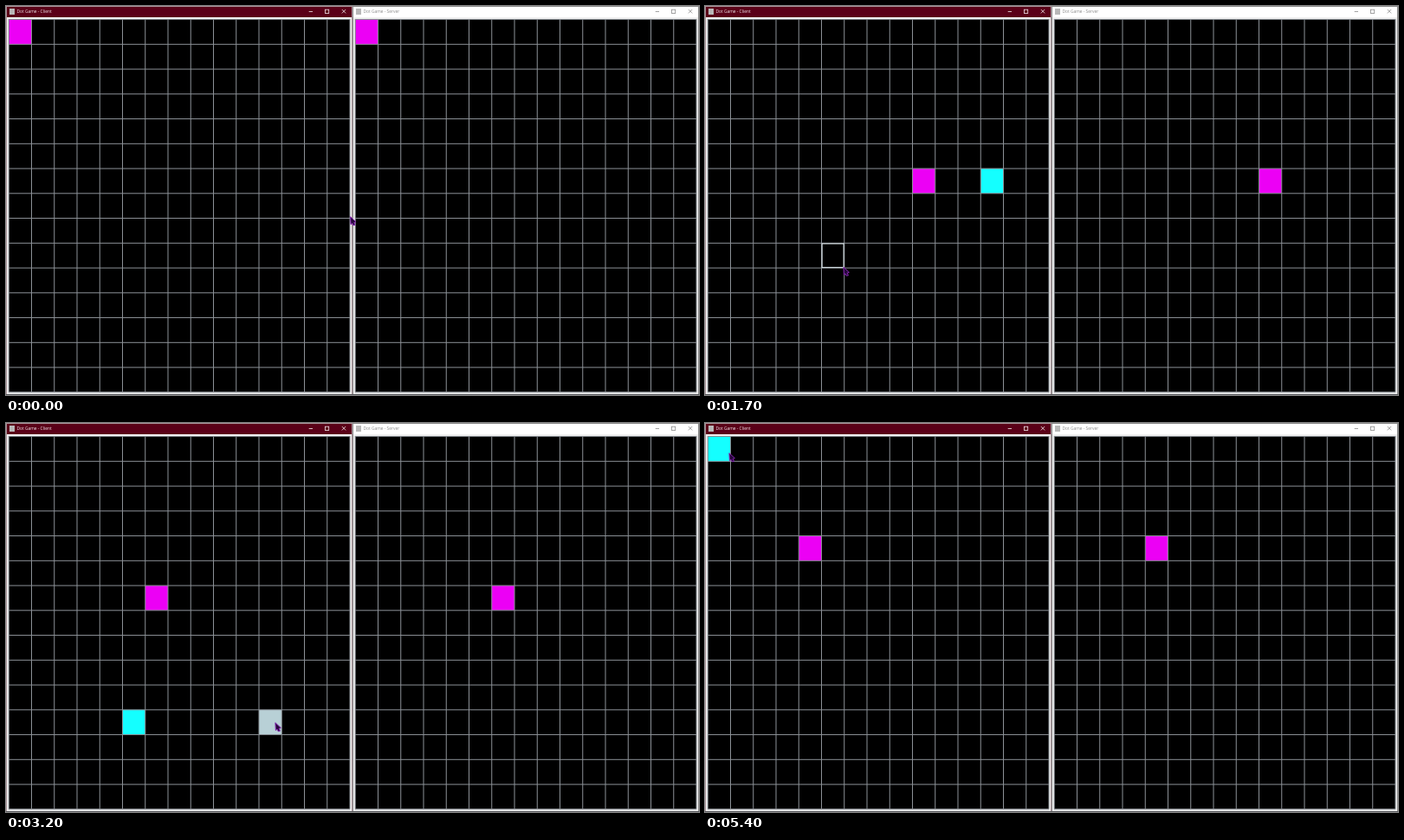
Write an HTML page with a canvas that moves like this. It is 800x450 px and loops after 5.5 s.

```html
<!DOCTYPE html>
<html lang="en">
<head>
<meta charset="utf-8">
<title>Dot Game</title>
<style>
html, body { margin: 0; width: 100%; height: 100%; overflow: hidden; background: #000; }
canvas { display: block; width: 800px; height: 450px; }
</style>
</head>
<body>
<canvas id="stage" width="800" height="450"></canvas>
<script>
const ctx = document.getElementById('stage').getContext('2d');
const LOOP = 5500, TICK = 100, CELLS = 15;
const LEFT = 3.25, TOP = 15.55, CELL_W = 26.25, CELL_H = 28.75;
const FIRST_STEP = 30, STEP = 190, NETWORK_LAG = 40;
const PRESS = 50, REST = 100;
const MAGENTA = '#ec00f5', CYAN = '#14ffff', PRESSED = '#b8d0d6';

// The player's clicks: time, then place in cell units.
const START = { at: 0, x: 15, y: 7.92 };
const clicks = [
  [400, 12.8, 6.9], [1800, 5.95, 9.95], [2160, 2.63, 5.56], [2450, 7.5, 5.5],
  [2890, 5.5, 11.5], [3250, 11.7, 11.5], [3600, 14.5, 14.5], [3950, 7.39, 6.92],
  [4180, 9.5, 11.5], [4380, 7.5, 4.5], [4800, 2.02, 2.02], [5150, 0.92, 0.65]
].map(([at, x, y]) => ({ at, x, y }));

const cellOf = p => [Math.floor(p.x), Math.floor(p.y)];
const lastClick = t => clicks.filter(c => c.at <= t).pop();

// The chaser takes one king's step towards the player's dot per beat.
function chaserAt(t) {
  const pos = [0, 0];
  for (let beat = FIRST_STEP; beat <= t; beat += STEP) {
    const goal = cellOf(lastClick(beat) || clicks[0]);
    goal.forEach((g, i) => pos[i] += Math.sign(g - pos[i]));
  }
  return pos;
}

// The pointer glides to each click, slowing down, and rests before it.
function pointerAt(t) {
  const from = lastClick(t) || START;
  const to = clicks.find(c => c.at > t) || from;
  const part = Math.min(1, (t - from.at) / (to.at - REST - from.at || 1));
  const ease = Math.sin(part * Math.PI / 2);
  return { x: from.x + (to.x - from.x) * ease, y: from.y + (to.y - from.y) * ease };
}

function rect(x, y, w, h, color) {
  ctx.fillStyle = color;
  ctx.fillRect(x, y, w, h);
}

function frameRect(x, y, w, h, color, weight) {
  ctx.strokeStyle = color;
  ctx.lineWidth = weight;
  ctx.strokeRect(x, y, w, h);
}

const colX = c => LEFT + c * CELL_W;
const rowY = r => TOP + r * CELL_H;

function drawWindow({ title, bar, ink, edge }, cells) {
  rect(0, 0, 400, 450, '#efefef');
  rect(0, 0, 400, 13, bar);
  frameRect(0.5, 0.5, 399, 449, edge, 1);
  rect(0, 449, 400, 1, '#55565a');
  rect(4, 3, 6, 7, '#b8b8b8');

  ctx.fillStyle = ink;
  ctx.font = '4.9px "Open Sans", sans-serif';
  ctx.fillText(title, 12.4, 8.3);
  frameRect(368.5, 4.2, 4.2, 4.2, ink, 0.8);
  ctx.beginPath();
  ctx.moveTo(349.7, 6.5); ctx.lineTo(354, 6.5);
  ctx.moveTo(387.8, 4); ctx.lineTo(392.2, 8.4);
  ctx.moveTo(392.2, 4); ctx.lineTo(387.8, 8.4);
  ctx.stroke();

  rect(3, 15, 394, 431.5, '#000');
  for (const [[c, r], color] of cells) rect(colX(c), rowY(r), CELL_W, CELL_H, color);
  for (let i = 0; i <= CELLS; i++) {
    rect(colX(i) - 0.5, 15, 1, 431.5, '#8c9197');
    rect(3, rowY(i) - 0.5, 394, 1, '#8c9197');
  }
}

function drawPointer({ x, y }) {
  ctx.save();
  ctx.translate(colX(x), rowY(y));
  ctx.fillStyle = '#26083a';
  ctx.strokeStyle = '#8425b0';
  ctx.lineWidth = 1;
  const arrow = new Path2D('M.5 .5 7 6.5 4.8 7.2 6 10 3.8 10.5 2.7 8 1 9.4Z');
  ctx.fill(arrow);
  ctx.stroke(arrow);
  ctx.restore();
}

function drawClient(t, pointer) {
  const dot = lastClick(t);
  const pressed = clicks.find(c => c.at - PRESS <= t && t < c.at);
  const cells = [];
  if (dot) cells.push([cellOf(dot), CYAN]);
  if (pressed) cells.push([cellOf(pressed), PRESSED]);
  cells.push([chaserAt(t - NETWORK_LAG), MAGENTA]);
  drawWindow({ title: 'Dot Game - Client', bar: '#5a0018', ink: '#f4e9ec', edge: '#a9949a' }, cells);

  const [c, r] = cellOf(pointer);
  const taken = cells.some(([[x, y]]) => x === c && y === r);
  if (c < CELLS && !taken) {
    frameRect(colX(c) + 0.6, rowY(r) + 0.6, CELL_W - 1.2, CELL_H - 1.2, '#d5dfe4', 1.2);
  }
}

function drawServer(t) {
  ctx.save();
  ctx.translate(400, 0);
  drawWindow({ title: 'Dot Game - Server', bar: '#fff', ink: '#8c8c8c', edge: '#8a8a8a' },
    [[chaserAt(t), MAGENTA]]);
  ctx.restore();
}

function frame(now) {
  const t = Math.floor((now % LOOP) / TICK) * TICK;
  const pointer = pointerAt(t);
  drawClient(t, pointer);
  drawServer(t);
  drawPointer(pointer);
  requestAnimationFrame(frame);
}
requestAnimationFrame(frame);
</script>
</body>
</html>
```
